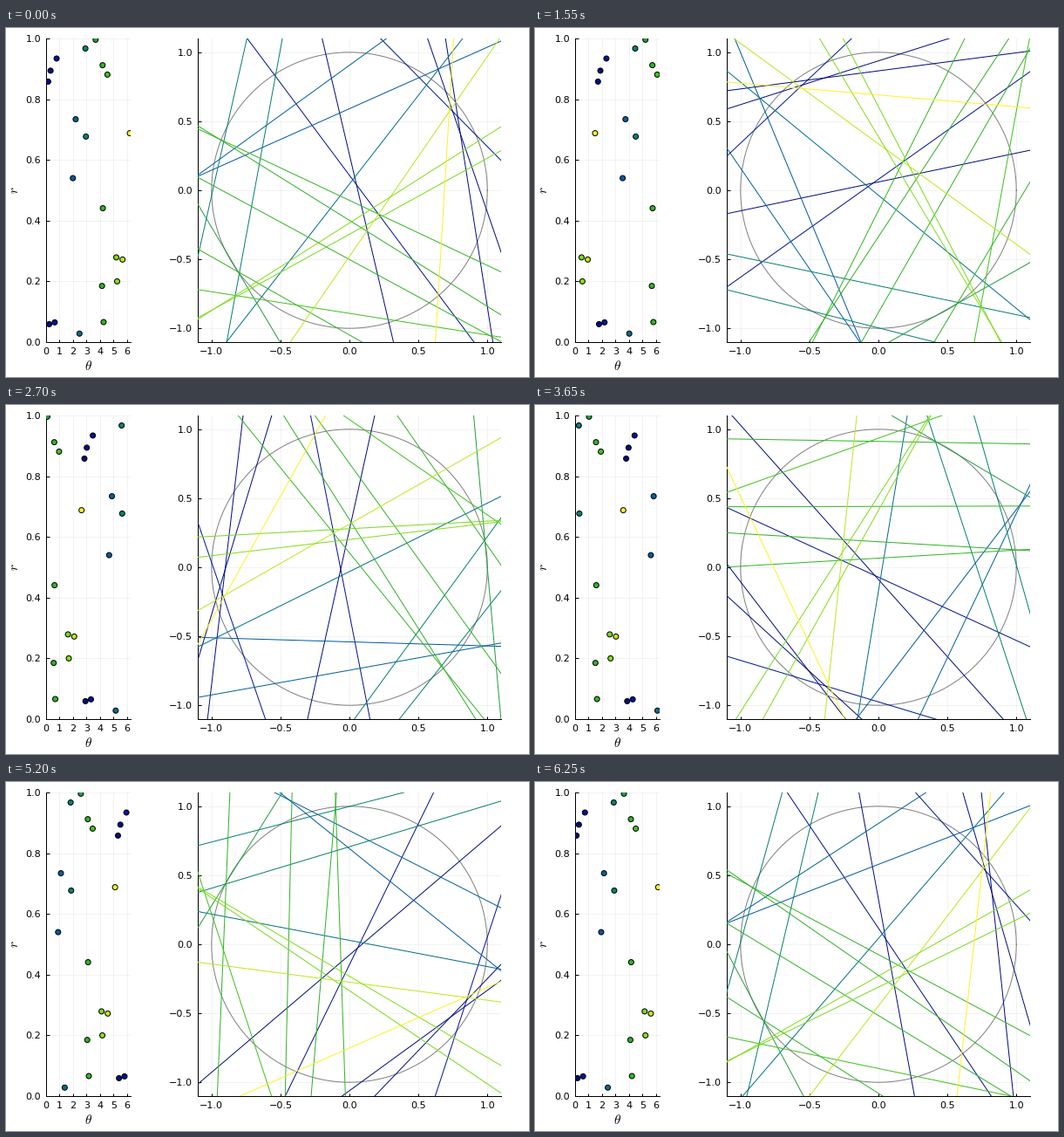
A matplotlib script that plays this animation: 600x400 px, repeating every 6300 ms.

```python
import numpy as np
import matplotlib.pyplot as plt
from matplotlib.animation import FuncAnimation
from matplotlib.collections import LineCollection
from matplotlib.colors import LinearSegmentedColormap

W, H, FRAMES, STEP = 600, 400, 126, 50
PX = 0.72  # points per pixel at 100 dpi
TAU = 2 * np.pi

plt.rcParams.update({"font.family": "DejaVu Sans", "mathtext.fontset": "cm"})

theta0 = np.array([0.78, 0.332, 0.155, 0.231, 0.642, 2.197, 1.99, 2.48, 2.92, 2.96,
                   3.68, 4.197, 4.557, 4.216, 4.155, 4.272, 5.216, 5.679, 5.278, 6.223])
r = np.array([0.934, 0.894, 0.858, 0.059, 0.065, 0.734, 0.540, 0.028, 0.967, 0.677,
              0.996, 0.912, 0.881, 0.441, 0.185, 0.066, 0.279, 0.272, 0.200, 0.688])

bgy = LinearSegmentedColormap.from_list("bgy", [
    "#000c7d", "#00149a", "#0030ad", "#0058a4", "#007389", "#0a8a62",
    "#2aa236", "#36ba1f", "#58d51b", "#b0e61c", "#fff123"])
colors = bgy((theta0 - theta0.min()) / np.ptp(theta0))

fig = plt.figure(figsize=(W / 100, H / 100), dpi=100, facecolor="white")


def panel(x, y, w, h, xlim, ylim, xticks, yticks):
    ax = fig.add_axes([x / W, 1 - (y + h) / H, w / W, h / H])
    ax.set(xlim=xlim, ylim=ylim, xticks=xticks, yticks=yticks)
    ax.spines[["top", "right"]].set_visible(False)
    ax.spines[["left", "bottom"]].set_linewidth(PX)
    ax.tick_params(direction="in", length=3.5 * PX, width=PX, labelsize=8, pad=6 * PX)
    ax.grid(color="black", alpha=0.1, lw=0.5 * PX)
    ax.set_axisbelow(True)
    return ax


polar = panel(46, 12, 97, 348, (0, TAU), (0, 1), range(7), np.linspace(0, 1, 6))
plane = panel(220, 12, 348, 348, (-1.1, 1.1), (-1.1, 1.1),
              np.linspace(-1, 1, 5), np.linspace(-1, 1, 5))


def label(x, y, s, rotation=0):
    fig.text(x / W, 1 - y / H, s, size=11, rotation=rotation, ha="center", va="center")


label(94, 387, r"$\theta$")
label(9, 186, r"$r$", 90)

t = np.linspace(0, TAU, 400)
plane.plot(np.cos(t), np.sin(t), color="gray", lw=PX)
lines = plane.add_collection(LineCollection([], colors=colors, linewidths=PX, zorder=3))
dots = polar.scatter(theta0, r, s=(6 * PX) ** 2, c=colors,
                     edgecolors="black", linewidths=PX, zorder=3)


def update(k):
    a = (theta0 + TAU * k / FRAMES) % TAU
    dots.set_offsets(np.column_stack([a, r]))
    # each dot (a, r) is the line x cos a + y sin a = r
    normal = np.column_stack([np.cos(a), np.sin(a)])
    along = np.column_stack([-np.sin(a), np.cos(a)])
    foot = r[:, None] * normal
    lines.set_segments(np.stack([foot - 3 * along, foot + 3 * along], axis=1))
    return dots, lines


anim = FuncAnimation(fig, update, frames=FRAMES, interval=STEP, repeat=True, repeat_delay=0)
plt.show()
```
